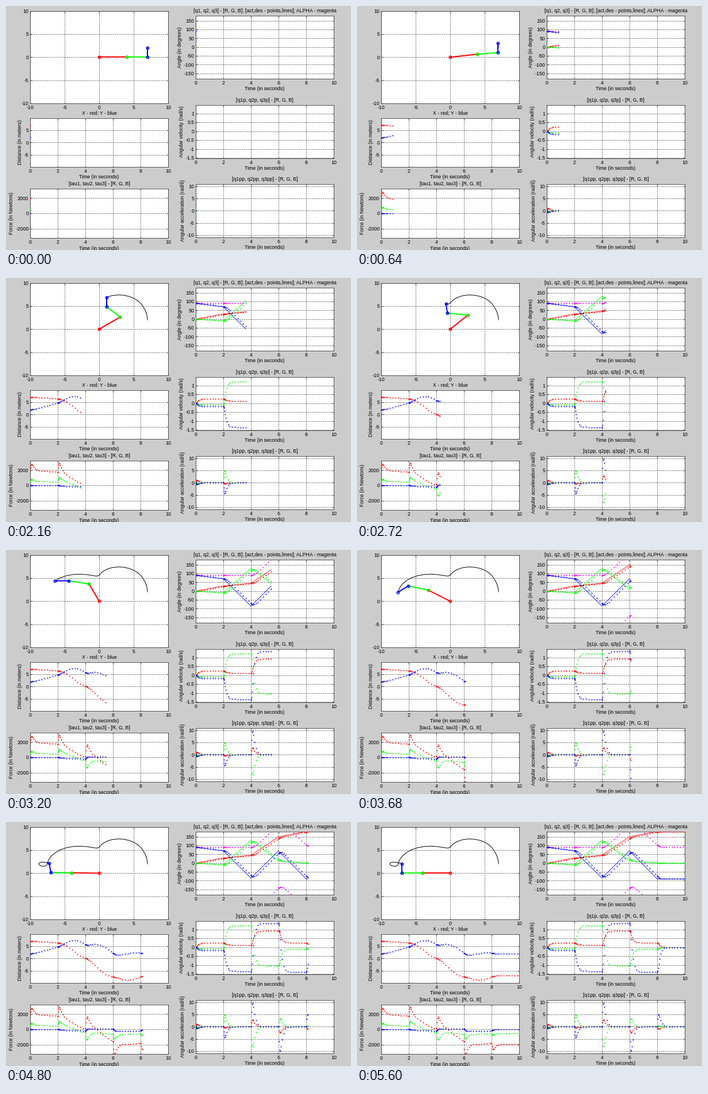
A matplotlib script for the animation above (5680 ms loop, 600 by 426 pixels).

```python
import numpy as np
import matplotlib.pyplot as plt
from matplotlib.animation import FuncAnimation

W, H, DPI = 600, 426, 64
PX = 72 / DPI  # points per pixel
FRAMES, INTERVAL = 71, 80
R, G, B, M = "#ff0000", "#00ff00", "#0000ff", "#ff00ff"
RGB = (R, G, B)

plt.rcParams["font.family"] = "Liberation Sans"

# ---- arm: three uniform rods following ramps between via points ----
LEN = np.array([4.0, 3.0, 2.0])
MASS = np.array([20.0, 15.0, 10.0])
GRAV, FRICTION, POLE = 9.81, 100.0, 10.0
KNOTS = np.arange(0, 12, 2.0)
VIA = np.array([[0, 0, 90], [30, -10, 70], [45, 130, -85],
                [150, 12, 70], [180, 0, -90], [180, 0, -90]], float)


def sample_times():
    """Solver steps: tiny after each via point, then capped at 0.2 s."""
    out = [0.0]
    segments = ((0.0215, 16, 0), (0.0215, 16, 2), (0.03, 15, 2),
                (0.03, 15, 2), (0.03, 15, 1))
    for t0, (first, count, hold) in zip(KNOTS, segments):
        steps = np.minimum(first * 1.28 ** np.arange(count), 0.2)
        out += [t0] * hold + list(t0 + np.minimum(np.cumsum(steps), 2.0))
    return np.array(out)


def track(t):
    """Joint angle, velocity and acceleration with a critically damped lag."""
    rates = np.diff(np.radians(VIA), axis=0) / 2
    jumps = np.diff(np.vstack([np.zeros(3), rates]), axis=0)
    q = np.tile(np.radians(VIA[0]), (len(t), 1))
    qp, qpp = np.zeros_like(q), np.zeros_like(q)
    for t0, jump in zip(KNOTS, jumps):
        s = np.maximum(t - t0, 0)[:, None]
        decay = np.exp(-POLE * s)
        q += jump * (s - 2 / POLE + (s + 2 / POLE) * decay)
        qp += jump * (1 - (1 + POLE * s) * decay)
        qpp += jump * POLE ** 2 * s * decay
    return q, qp, qpp


def torques(q, qp, qpp):
    """Inverse dynamics with positions as complex numbers."""
    th, w, a = (np.cumsum(v, axis=1) for v in (q, qp, qpp))
    link = LEN * np.exp(1j * th)
    acc = link * (1j * a - w ** 2)
    joint = np.cumsum(link, axis=1) - link
    com = joint + link / 2
    com_acc = np.cumsum(acc, axis=1) - acc / 2 + 1j * GRAV
    spin = MASS * LEN ** 2 / 12 * a
    tau = FRICTION * qp
    for j in range(3):
        for i in range(j, 3):
            arm = com[:, i] - joint[:, j]
            tau[:, j] += MASS[i] * (arm.conj() * com_acc[:, i]).imag + spin[:, i]
    return tau


T = sample_times()
Q, QP, QPP = track(T)
TAU = torques(Q, QP, QPP)
ABS = np.cumsum(Q, axis=1)
POINTS = np.hstack([np.zeros((len(T), 1)),
                    np.cumsum(LEN * np.exp(1j * ABS), axis=1)])
TIP = POINTS[:, 3]
ALPHA = (np.degrees(ABS[:, 2]) + 180) % 360 - 180
DESIRED = np.column_stack([np.interp(T, KNOTS, VIA[:, j]) for j in range(3)])

# ---- figure ----
fig = plt.figure(figsize=(W / DPI, H / DPI), dpi=DPI, facecolor="#cccccc")


def label(x, y, s, size=8.8, **kw):
    fig.text(x / W, 1 - y / H, s, fontsize=size * PX, va="baseline",
             rotation_mode="anchor", **kw)


def panel(x0, top, bottom, xlim, ylim, xticks, yticks,
          title="", xlabel="", ylabel="", label_x=0):
    ax = fig.add_axes([x0 / W, 1 - bottom / H, 240 / W, (bottom - top) / H])
    ax.set(xlim=xlim, ylim=ylim, xticks=xticks, yticks=yticks)
    ax.set_axisbelow(True)
    ax.grid(color="#2a2a2a", lw=0.8 * PX, ls=(0, (2, 2)))
    ax.tick_params(direction="in", length=2.5 * PX, width=0.7 * PX,
                   top=True, right=True, labelbottom=False, labelleft=False)
    for spine in ax.spines.values():
        spine.set(linewidth=0.8 * PX, color="#333333")
    for v in xticks:
        x = x0 + 240 * (v - xlim[0]) / (xlim[1] - xlim[0])
        label(x, bottom + 10, f"{v:g}", ha="center")
    for v in yticks:
        y = bottom - (bottom - top) * (v - ylim[0]) / (ylim[1] - ylim[0])
        label(x0 - 2.5, y + 3.2, f"{v:g}", ha="right")
    label(x0 + 120, top - 6, title, ha="center")
    label(x0 + 120, bottom + 20.3, xlabel, ha="center")
    label(label_x, (top + bottom) / 2, ylabel, ha="center", rotation=90)
    return ax


def time_panel(x0, top, bottom, ylim, yticks, title, ylabel, label_x):
    return panel(x0, top, bottom, (0, 10), ylim, range(0, 11, 2), yticks,
                 title, "Time (in seconds)", ylabel, label_x)


fives = range(-10, 11, 5)
ax_arm = panel(42, 8.6, 170.2, (-10, 10), (-10, 10), fives, fives)
ax_dist = time_panel(42, 195.6, 281, (-10, 10), (-5, 0, 5),
                     "X - red; Y - blue", "Distance (in meters)", 27)
ax_tau = time_panel(42, 319.2, 405.2, (-3200, 3200), (-2000, 0, 2000),
                    "[tau1, tau2, tau3] - [R, G, B]",
                    "Force (in Newtons)", 12)
ax_q = time_panel(330, 16.6, 127, (-180, 180), range(-150, 151, 50),
                  "[q1, q2, q3] - [R, G, B]; [act,des - points,lines]; "
                  "ALPHA - magenta", "Angle (in degrees)", 305)
ax_qp = time_panel(330, 172.6, 266, (-1.53, 1.49), np.arange(-1.5, 1.1, 0.5),
                   "[q1p, q2p, q3p] - [R, G, B]",
                   "Angular velocity (rad/s)", 308)
ax_qpp = time_panel(330, 310.6, 404.2, (-11, 11), fives,
                    "[q1pp, q2pp, q3pp] - [R, G, B]",
                    "Angular acceleration (rad/s)", 310)
label(304.5, 308, "2", size=4.5, ha="center", rotation=90)

# ---- moving parts: (artist, x data, y data) revealed up to the sample ----
series = []


def dots(ax, y, color):
    line, = ax.plot([], [], "o", color=color, ms=2 * PX, mew=0, zorder=4)
    series.append((line, T, y))


def curve(ax, x, y, color, lw):
    line, = ax.plot([], [], color=color, lw=lw * PX, zorder=3)
    series.append((line, x, y))


curve(ax_arm, TIP.real, TIP.imag, "black", 1)
dots(ax_dist, TIP.real, R)
dots(ax_dist, TIP.imag, B)
dots(ax_q, ALPHA, M)
for j, color in enumerate(RGB):
    curve(ax_q, T, DESIRED[:, j], color, 0.8)
    dots(ax_q, np.degrees(Q[:, j]), color)
    dots(ax_qp, QP[:, j], color)
    dots(ax_qpp, QPP[:, j], color)
    dots(ax_tau, TAU[:, j], color)

links = [ax_arm.plot([], [], "-o", color=c, lw=2 * PX, ms=4.3 * PX,
                     mfc="none", mew=1.5 * PX, zorder=5)[0] for c in RGB]


def update(n):
    k = int(1.2 * n + 0.5)
    for line, x, y in series:
        line.set_data(x[:k + 1], y[:k + 1])
    for j, line in enumerate(links):
        ends = POINTS[k, j:j + 2]
        line.set_data(ends.real, ends.imag)
    return links + [s[0] for s in series]


anim = FuncAnimation(fig, update, frames=FRAMES, interval=INTERVAL,
                     init_func=lambda: update(0), repeat=True, repeat_delay=0)
plt.show()
```
